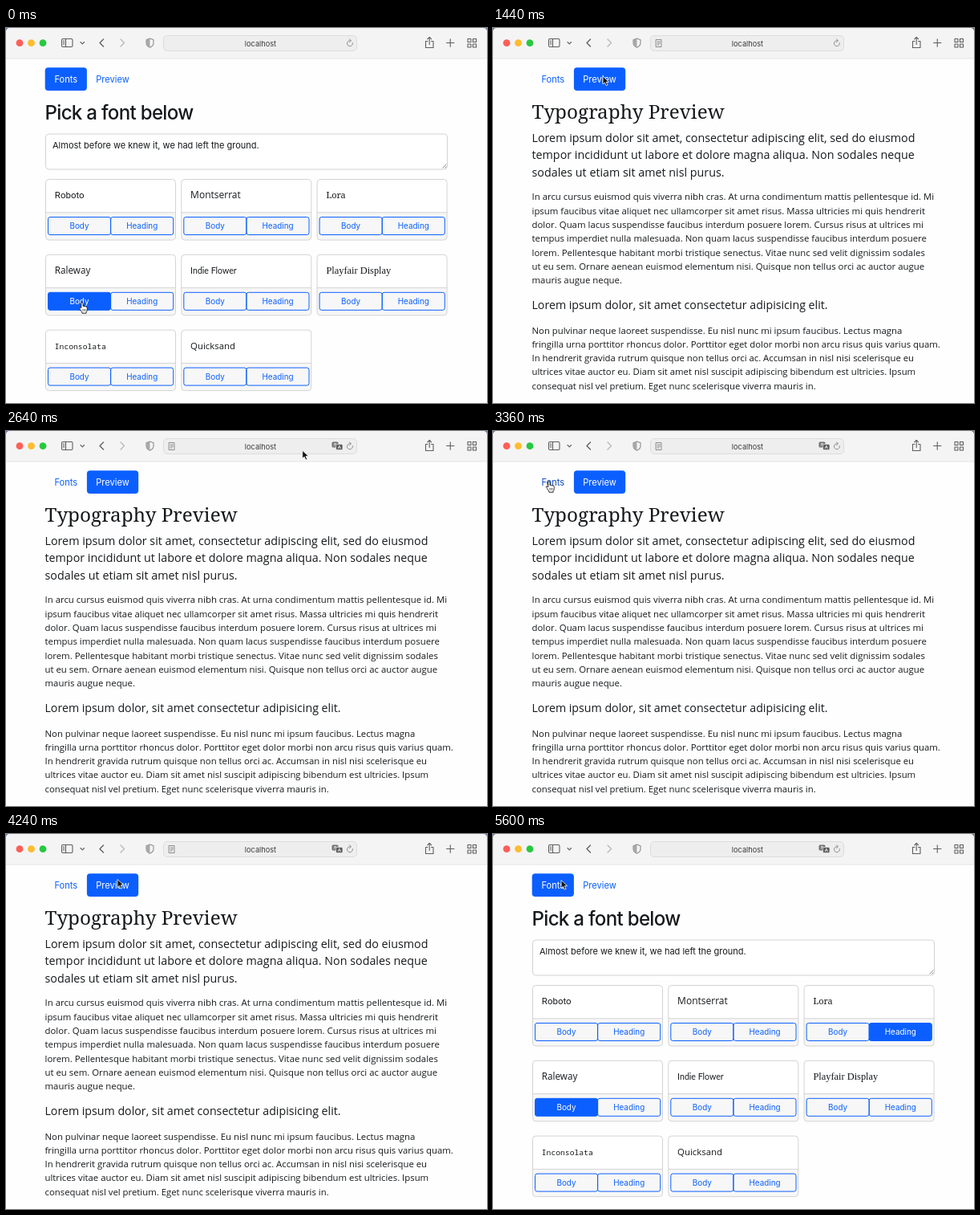
Recreate the animation shown at these times as an HTML page. Size 600 px wide and 467 px high, loop 5760 ms.

```html
<!DOCTYPE html>
<html lang="en">
<head>
<meta charset="utf-8">
<title>Font picker</title>
<style>
  html, body { margin: 0; height: 100%; overflow: hidden; background: #6d83ad; }
  svg { display: block; width: 600px; height: 467px; font-family: Inter, sans-serif; fill: #16191c; }
  .icon { fill: none; stroke: #5f5d5f; stroke-width: 1.1; stroke-linecap: round; stroke-linejoin: round; }
  .thin { stroke: #777577; stroke-width: .8; }
  .raleway { font-family: "Open Sans", sans-serif; }
  .lora { font-family: "Noto Serif", serif; }
</style>
</head>
<body>
<svg id="stage" viewBox="0 0 600 467">
  <path d="M0 467V5a5 5 0 0 1 5-5h590a5 5 0 0 1 5 5v462z" fill="#fefefe"/>
  <path d="M0 38V5a5 5 0 0 1 5-5h590a5 5 0 0 1 5 5v33z" fill="#f5f4f5"/>
  <path d="M0 38h600" stroke="#e6e4e6"/>
  <circle cx="17" cy="18.7" r="4.4" fill="#fe5f57"/>
  <circle cx="31.5" cy="18.7" r="4.4" fill="#febc2e"/>
  <circle cx="46" cy="18.7" r="4.4" fill="#28c840"/>
  <rect x="196.5" y="9.5" width="241" height="19" rx="4.5" fill="#efeeef" stroke="#dddbdd"/>
  <text x="317.5" y="22.6" font-size="9.2" text-anchor="middle" fill="#3c3a3c">localhost</text>
  <g class="icon">
    <path d="M71 13.5h10.5q1.5 0 1.5 1.5v7q0 1.5-1.5 1.5h-10.5q-1.5 0-1.5-1.5v-7q0-1.5 1.5-1.5zM74.5 13.5v10M71.3 16h1.5M71.3 18h1.5M71.3 20h1.5"/>
    <path d="M93 17.5l2.3 2.3 2.3-2.3"/>
    <path d="M121.5 14l-4.5 4.5 4.5 4.5" stroke-width="1.3"/>
    <path d="M143 14l4.5 4.5-4.5 4.5" stroke="#b8b6b8" stroke-width="1.3"/>
    <path d="M179.5 13l4.5 1.7v4q0 3.5-4.5 5.500-4.500-2-4.500-5.500v-4z" stroke="#8d8b8d"/>
    <path d="M179.5 13v11.2q-4.5-2-4.5-5.5v-4z" fill="#a9a7a9" stroke="none"/>
    <path class="thin" d="M432.400 18.500a3.500 3.500 0 1 1-2.600-2.700M428.500 13.800l2 2-2 1.900"/>
    <path d="M526 16.5h-2.5v8h9.5v-8h-2.5M528.2 20.5v-9M525.7 13.8l2.5-2.5 2.5 2.500"/>
    <path d="M549.5 18.500h9.500M554.250 13.700v9.600"/>
    <path d="M576 13.500h4v4h-4zM582.500 13.500h4v4h-4zM576 20h4v4h-4zM582.500 20h4v4h-4z"/>
  </g>
  <path id="reader" class="icon thin" d="M203.500 14.500h6.500v9h-6.500zM205 17h3.500M205 19h3.500M205 21h2"/>
  <g id="loading" class="icon">
    <path d="M216.500 12v14" stroke="#dbd9db"/>
    <circle cx="226" cy="19" r="4" stroke="#d8d6d8"/>
  </g>
  <g id="translate">
    <rect x="406.500" y="13.500" width="8" height="7" rx="1.500" fill="#737173"/>
    <rect x="411.500" y="16.500" width="8.500" height="7" rx="1.500" fill="#59575a" stroke="#efeeef" stroke-width=".7"/>
    <path d="M408.500 16h4M410.500 15v1q0 2-2 3M414 22l1.800-4 1.800 4M414.600 20.800h2.400" fill="none" stroke="#fff" stroke-width=".7"/>
  </g>
  <g id="tabs"></g>
  <g id="fonts">
    <text id="heading" x="48.500" y="113.500"></text>
    <rect x="49.500" y="132" width="501" height="44" rx="4" fill="#fff" stroke="#d0d3d7"/>
    <text id="sample" x="58" y="149.500">Almost before we knew it, we had left the ground.</text>
    <path d="M544.500 174.500l5-5M547.500 174.500l2-2" stroke="#777" stroke-width=".8"/>
  </g>
  <g id="preview">
    <text class="lora" x="48.500" y="113.300" font-size="24.3">Typography Preview</text>
  </g>
  <path id="arrow" d="M0 0v10l2.400-2.100 1.700 3.800 1.900-.8-1.700-3.700h3.300z" fill="#111" stroke="#fff" stroke-width=".8"/>
  <g id="hand" fill="#fff" stroke="#111" stroke-width=".9" stroke-linejoin="round">
    <path d="M-1.200 1q0-1.300 1.100-1.300t1.200 1.300v3.500q1-.8 1.900.2 1.100-.6 1.800.4 1.500-.2 1.500 1.300v2.300q0 2-1.200 3v1.500h-5.200v-1.300q-1.600-1.600-2.300-3.300-.8-1.600-1.500-2.200.7-1.500 2.700.3z"/>
    <path d="M.8 8v2.600M2.500 8v2.600M4.200 8v2.600" stroke-width=".6"/>
  </g>
</svg>
<script>
const LOOP = 5760, BLUE = '#0b5fff', DARK = '#0a49c2';
const $ = id => document.getElementById(id);

function add(parent, tag, attrs, text = '') {
  const node = document.createElementNS('http://www.w3.org/2000/svg', tag);
  set(node, attrs);
  node.textContent = text;
  return parent.appendChild(node);
}
function set(node, attrs) {
  for (const key in attrs) node.setAttribute(key, attrs[key]);
}
const show = (id, on) => set($(id), { visibility: on ? 'visible' : 'hidden' });

function makeButton(parent, x, y, w, h, label, size) {
  const rect = add(parent, 'rect', { x, y, width: w, height: h, rx: size > 10 ? 4 : 2.5 });
  const text = add(parent, 'text', {
    x: x + w / 2, y: y + h / 2 + size * .36, 'font-size': size, 'text-anchor': 'middle'
  }, label);
  return { rect, text, contains: (px, py) => px >= x && px <= x + w && py >= y && py <= y + h };
}

const fontsTab = makeButton($('tabs'), 48.7, 49.3, 52.2, 28.7, 'Fonts', 11.1);
const previewTab = makeButton($('tabs'), 100.9, 49.3, 64.3, 28.7, 'Preview', 11.1);

const cards = [
  ['Roboto', 'Roboto, sans-serif', 11.5],
  ['Montserrat', '"Open Sans", sans-serif', 12],
  ['Lora', '"Noto Serif", serif', 11],
  ['Raleway', '"Open Sans", sans-serif', 11.7],
  ['Indie Flower', 'Lato, cursive', 10.6],
  ['Playfair Display', '"Liberation Serif", serif', 12.4],
  ['Inconsolata', '"Noto Sans Mono", monospace', 9.7],
  ['Quicksand', '"Open Sans", sans-serif', 11.4]
].map(([name, family, size], i) => {
  const x = 49 + i % 3 * 169.3, y = 188 + Math.floor(i / 3) * 93.8, page = $('fonts');
  add(page, 'rect', { x: x + .5, y: y + .5, width: 162, height: 75.5, rx: 4, fill: '#fff' });
  add(page, 'path', { d: `M${x + .5} ${y + 42}h162v30q0 4-4 4h-154q-4 0-4-4z`, fill: '#f7f7f7' });
  add(page, 'path', { d: `M${x} ${y + 41.8}h163`, stroke: '#d3d3d3' });
  add(page, 'rect', { x: x + .5, y: y + .5, width: 162, height: 75.5, rx: 4, fill: 'none', stroke: '#d3d3d3' });
  add(page, 'text', { x: x + 11.8, y: y + 24.3, 'font-family': family, 'font-size': size }, name);
  return ['Body', 'Heading'].map((label, k) =>
    makeButton(page, x + 3.5 + k * 78.2, y + 47.5, 78, 22, label, 9.9));
});

function addLines(top, leading, size, lines) {
  lines.forEach((line, i) => add($('preview'), 'text',
    { class: 'raleway', x: 48.5, y: top + i * leading, 'font-size': size }, line));
}
addLines(141.6, 21.7, 14.3, [
  'Lorem ipsum dolor sit amet, consectetur adipiscing elit, sed do eiusmod',
  'tempor incididunt ut labore et dolore magna aliqua. Non sodales neque',
  'sodales ut etiam sit amet nisl purus.'
]);
addLines(214.3, 17.33, 11.4, [
  'In arcu cursus euismod quis viverra nibh cras. At urna condimentum mattis pellentesque id. Mi',
  'ipsum faucibus vitae aliquet nec ullamcorper sit amet risus. Massa ultricies mi quis hendrerit',
  'dolor. Quam lacus suspendisse faucibus interdum posuere lorem. Cursus risus at ultrices mi',
  'tempus imperdiet nulla malesuada. Non quam lacus suspendisse faucibus interdum posuere',
  'lorem. Pellentesque habitant morbi tristique senectus. Vitae nunc sed velit dignissim sodales',
  'ut eu sem. Ornare aenean euismod elementum nisi. Quisque non tellus orci ac auctor augue',
  'mauris augue neque.'
]);
addLines(350.3, 0, 14.2, ['Lorem ipsum dolor, sit amet consectetur adipisicing elit.']);
addLines(380.5, 17.33, 11.35, [
  'Non pulvinar neque laoreet suspendisse. Eu nisl nunc mi ipsum faucibus. Lectus magna',
  'fringilla urna porttitor rhoncus dolor. Porttitor eget dolor morbi non arcu risus quis varius quam.',
  'In hendrerit gravida rutrum quisque non tellus orci ac. Accumsan in nisl nisi scelerisque eu',
  'ultrices vitae auctor eu. Diam sit amet nisl suscipit adipiscing bibendum est ultricies. Ipsum',
  'consequat nisl vel pretium. Eget nunc scelerisque viverra mauris in.'
]);

// Cursor moves: start, end, x, y
const moves = [
  [-1, 0, 95, 342], [220, 560, 480, 246], [840, 1200, 137, 60], [1440, 1880, 426, 17],
  [2480, 3120, 70, 63], [3520, 3840, 139, 56.5], [4320, 4800, 86, 58], [5200, 5280, 85, 57.5]
];
function cursorAt(t) {
  let x = 95, y = 342;
  for (const [start, end, toX, toY] of moves) {
    const p = Math.min(1, Math.max(0, (t - start) / (end - start)));
    const ease = p * p * (3 - 2 * p);
    x += (toX - x) * ease;
    y += (toY - y) * ease;
  }
  return [x, y];
}

const headings = {
  start: { text: 'Pick a font below', size: 24.1, weight: 500, spacing: -.7, sample: 11, style: '' },
  raleway: { text: 'Raleway', size: 25, weight: 500, spacing: 0, sample: 11.4, style: 'raleway' },
  lora: { text: 'Lora', size: 24.3, weight: 400, spacing: 0, sample: 10.95, style: 'lora' }
};

function paint(button, filled, dark, outlined) {
  const color = dark ? DARK : BLUE;
  set(button.rect, { fill: filled ? color : 'transparent', stroke: outlined ? (filled ? color : BLUE) : 'none' });
  set(button.text, { fill: filled ? '#fff' : color });
}

function draw(t) {
  const [x, y] = cursorAt(t);
  const preview = t >= 1280 && t < 3440 || t >= 4000 && t < 5120;
  show('preview', preview);
  show('fonts', !preview);
  show('reader', preview);
  show('loading', t >= 1960 && t < 2240);
  show('translate', t >= 2320);

  paint(fontsTab, !preview, preview && fontsTab.contains(x, y));
  paint(previewTab, preview, !preview && previewTab.contains(x, y));
  let link = (preview ? fontsTab : previewTab).contains(x, y);

  cards.forEach((pair, i) => pair.forEach((button, k) => {
    const checked = i === 3 && k === 0 && t >= 160 || i === 2 && k === 1 && t >= 620;
    const hover = !preview && button.contains(x, y);
    link ||= hover;
    paint(button, checked || hover, checked && hover, true);
  }));

  const h = headings[t < 160 || t >= 2080 ? 'start' : t < 620 ? 'raleway' : 'lora'];
  set($('heading'), { class: h.style, 'font-size': h.size, 'font-weight': h.weight, 'letter-spacing': h.spacing });
  $('heading').textContent = h.text;
  set($('sample'), { class: h.style, 'font-size': h.sample });

  show('hand', link);
  show('arrow', !link);
  set($(link ? 'hand' : 'arrow'), { transform: `translate(${x} ${y})` });
}

function tick() {
  draw(performance.now() % LOOP);
  requestAnimationFrame(tick);
}
tick();
</script>
</body>
</html>
```
